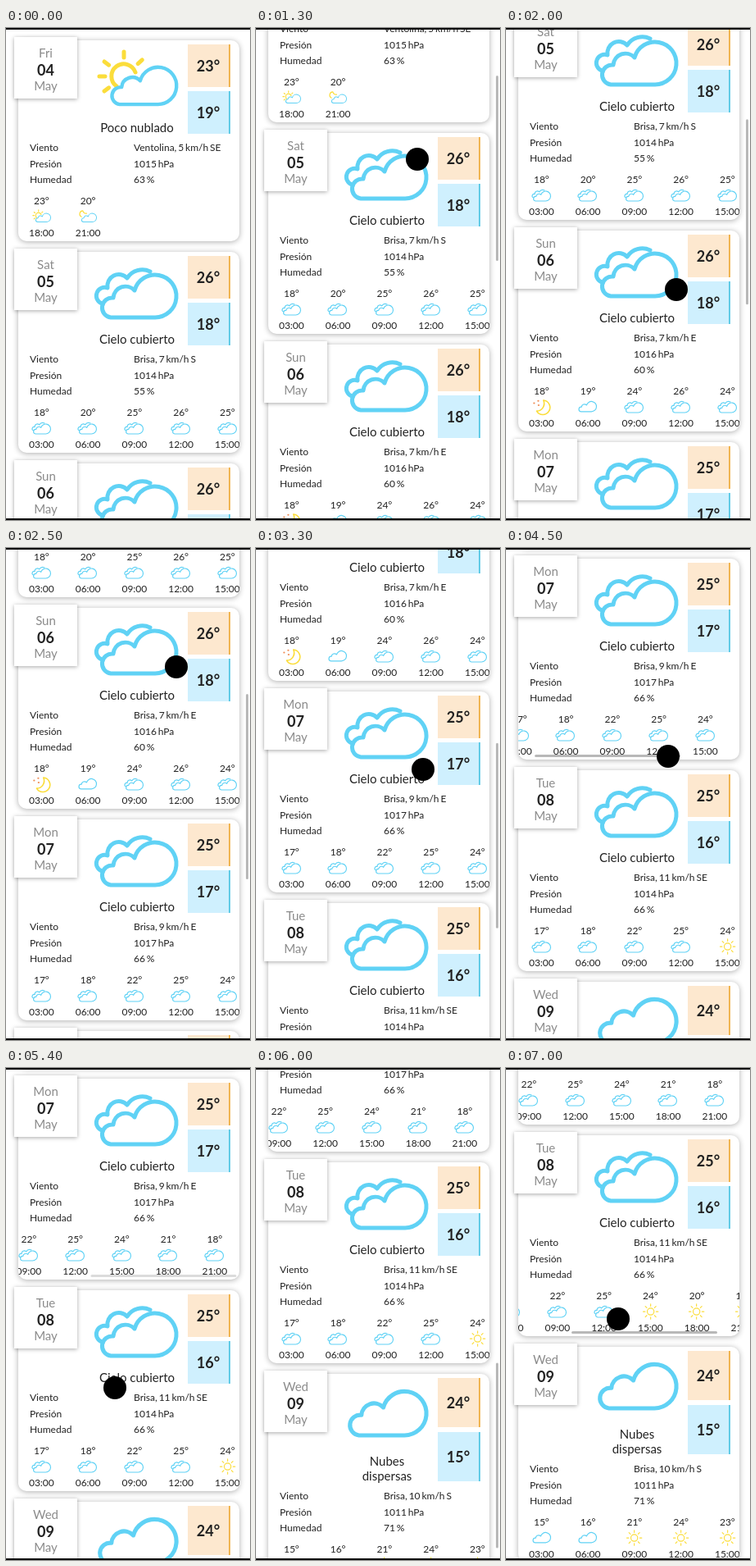
These frames come from a looping animation (298x600 px, 7.1 s). An HTML page:

```html
<!DOCTYPE html>
<html lang="es">
<head>
<meta charset="utf-8">
<title>Pronóstico</title>
<style>
  html, body { margin: 0; width: 100%; height: 100%; overflow: hidden; background: #fff; }
  body { font: 12px Lato, sans-serif; color: #222; }
  #stage { position: relative; width: 298px; height: 600px; overflow: hidden; }
  #stage::before, #stage::after { content: ""; position: absolute; z-index: 2; left: 0; width: 100%; height: 2px; background: #0c0c0c; }
  #stage::before { top: 0; }
  #stage::after { bottom: 0; }
  #stage div, #stage svg { position: absolute; }
  #list { left: 0; top: 0; }
  .card { left: 15px; width: 270px; border-radius: 10px; background: #fff; box-shadow: 0 1px 7px rgba(0,0,0,.32); }
  .date { left: -5px; top: -4px; width: 77px; height: 75px; background: #fff; box-shadow: 0 1px 5px rgba(0,0,0,.34); }
  .text { height: 20px; line-height: 20px; white-space: nowrap; }
  .mid { text-align: center; }
  .grey { color: #8b8b8b; font-size: 15px; }
  .bold { font-size: 18px; font-weight: 700; }
  .value { word-spacing: -1.2px; }
  .temp { left: 207px; width: 50px; display: grid; place-items: center; border-right: 2px solid; }
  .max { top: 5px; background: #fde8cf; border-color: #f0b552; }
  .min { background: #cff0fe; border-color: #62cbe6; }
  .sky { left: 75px; width: 140px; line-height: 18px; font-size: 15px; text-align: center; }
  .hours { left: 0; width: 270px; height: 61px; overflow: hidden; border-radius: 0 0 10px 10px; }
  .bar { background: #b8b8b8; border-radius: 2px; opacity: 0; }
  .hbar { width: 178px; height: 3px; left: 2px; }
  #vbar { width: 3px; height: 226px; left: 293px; }
  #dot { width: 28px; height: 28px; border-radius: 50%; background: #000; }
  svg { fill: none; stroke-width: 5; stroke-linecap: round; stroke-linejoin: round; overflow: visible; }
  .blue { stroke: #60d2f5; }
  .gold { stroke: #fbdd3b; }
</style>
</head>
<body>
<div id="stage">
  <div id="list"></div>
  <div id="vbar" class="bar"></div>
  <div id="dot"></div>
</div>
<script>
const PITCH = 258, STEP = 56.75, LOOP = 7100;
const $ = id => document.getElementById(id);

// Icons share a 110 x 70 box
const cloudPath = 'M22 65H76A26 26 0 1 0 51 32A15 15 0 0 0 25 41A12 12 0 0 0 22 65Z';
const cloudAt = place => `<path class="blue" d="${cloudPath}" transform="${place}"/>`;
const rays = (x, y, r1, r2, angles) => angles.map(a => {
  const c = Math.cos(a * Math.PI / 180), s = Math.sin(a * Math.PI / 180);
  return `M${x + r1 * c} ${y + r1 * s}L${x + r2 * c} ${y + r2 * s}`;
}).join('');
const small = 'translate(13.5 6.5) scale(.87)';
const icons = {
  overcast: cloudAt('') + '<path class="blue" d="M11 48A10 10 0 0 1 18 29A14 14 0 0 1 42 17A22 22 0 0 1 70 9"/>',
  cloud: cloudAt('translate(-3 -7) scale(1.03)'),
  sunny: `<path class="gold" d="M29 41A15 15 0 1 1 52 24${rays(38, 29, 23, 30, [-180, -143, -90, -42, 143])}"/>` + cloudAt(small),
  night: '<path class="gold" d="M22 36A17 17 0 0 1 30 4A18 18 0 0 0 50 18"/>' + cloudAt(small),
  sun: `<path class="gold" d="M37 35a18 18 0 1 0 36 0a18 18 0 1 0 -36 0${rays(55, 35, 29, 40, [0, 45, 90, 135, 180, 225, 270, 315])}"/>`,
  moon: '<path class="gold" stroke-width="7" d="M64 0A38 38 0 1 1 28 57A40 40 0 0 0 64 0Z"/>' +
        '<path stroke="#f0905a" stroke-width="9" d="M14 15h1M36 3h1M38 26h1"/>'
};
const codes = { o: 'overcast', c: 'cloud', p: 'sunny', n: 'night', s: 'sun', m: 'moon' };
const icon = (name, x, y, scale) =>
  `<svg width="110" height="70" style="left:${x}px;top:${y}px;transform-origin:0 0;transform:scale(${scale})">${icons[name]}</svg>`;
const text = (s, x, y, cls = '', width = '') =>
  `<div class="text ${cls}" style="left:${x}px;top:${y - 10}px;${width && `width:${width}px`}">${s}</div>`;

// name, max, min, sky, icon, wind, pressure, humidity, first hour, hourly temperature + icon code
const days = [
  ['Fri', 23, 19, 'Poco nublado', 'sunny', 'Ventolina, 5 km/h SE', 1015, 63, 18, '23p 20n'],
  ['Sat', 26, 18, 'Cielo cubierto', 'overcast', 'Brisa, 7 km/h S', 1014, 55, 3, '18o 20o 25o 26o 25o'],
  ['Sun', 26, 18, 'Cielo cubierto', 'overcast', 'Brisa, 7 km/h E', 1016, 60, 3, '18m 19c 24o 26o 24o'],
  ['Mon', 25, 17, 'Cielo cubierto', 'overcast', 'Brisa, 9 km/h E', 1017, 66, 3, '17o 18o 22o 25o 24o 21o 18o'],
  ['Tue', 25, 16, 'Cielo cubierto', 'overcast', 'Brisa, 11 km/h SE', 1014, 66, 3, '17o 18o 22o 25o 24s 20s 18s'],
  ['Wed', 24, 15, 'Nubes<br>dispersas', 'cloud', 'Brisa, 10 km/h S', 1011, 71, 3, '15c 16c 21s 24s 23s']
];

$('list').innerHTML = days.map(([day, max, min, sky, pic, wind, press, hum, first, hourly], i) => {
  const extra = sky.includes('<br>') ? 18 : 0;
  const tempHeight = 51.5 + extra * .45;
  const rows = [['Viento', wind], ['Presión', press + ' hPa'], ['Humedad', hum + ' %']];
  const hours = hourly.split(' ').map((item, k) => {
    const x = k * STEP;
    const clock = String(first + 3 * k).padStart(2, '0') + ':00';
    return text(item.slice(0, 2) + '°', x, 12, 'mid', STEP) +
      icon(codes[item[2]], x + 15.7, 23, .23) + text(clock, x, 51, 'mid', STEP);
  }).join('');
  return `<div class="card" style="top:${15 + i * PITCH}px;height:${245 + extra}px">
    <div class="date">${text(day, 0, 19, 'mid grey', 77)}${text('0' + (4 + i), 0, 39.5, 'mid bold', 77)}${text('May', 0, 59, 'mid grey', 77)}</div>
    ${icon(pic, 91, 15, 1)}
    <div class="temp max bold" style="height:${tempHeight}px">${max}°</div>
    <div class="temp min bold" style="top:${62 + extra / 2}px;height:${tempHeight}px">${min}°</div>
    <div class="sky" style="top:97px">${sky}</div>
    ${rows.map(([a, b], r) => text(a, 14, 131 + extra + r * 19.6) + text(b, 141, 131 + extra + r * 19.6, 'value')).join('')}
    <div class="hours" style="top:${184 + extra}px"><div class="strip">${hours}</div></div>
    <div class="bar hbar" style="top:${239 + extra}px"></div>
  </div>`;
}).join('');

const track = (t, keys) => {
  const n = keys.findIndex(k => k[0] > t);
  if (n < 0) return keys[keys.length - 1][1];
  if (n === 0) return keys[0][1];
  const [t0, a] = keys[n - 1], [t1, b] = keys[n];
  return a + (b - a) * (t - t0) / (t1 - t0);
};

const pageKeys = [[900, 0], [1300, 145], [1500, 220], [1700, 262], [1900, 280], [2100, 288], [2200, 302],
  [2500, 458], [2700, 500], [3000, 514], [3300, 614], [3500, 700], [3700, 745], [3900, 768], [4200, 776],
  [5500, 776], [5900, 920], [6200, 955], [6500, 965]];
const pageFade = [[800, 0], [900, 1], [4250, 1], [4450, 0], [5500, 0], [5600, 1], [6500, 1], [6800, 0]];
const strips = [
  { day: 3, keys: [[4350, 0], [4500, 27], [4800, 105], [5000, 125], [5100, 129]], fade: [[4350, 0], [4450, 1], [5300, 1], [5500, 0]] },
  { day: 4, keys: [[6600, 0], [7000, 94]], fade: [[6600, 0], [6700, 1]] }
];
// from, to, x, y, and which scroll offset the finger drags
const touches = [
  [700, 1500, 197, 305, 'page'], [2000, 2700, 208, 603, 'page'], [2900, 3600, 204, 884, 'page'],
  [4300, 4900, 225, 254, 0], [5300, 5900, 133, 1166, 'page'], [6450, LOOP, 231, 306, 1]
];
const stripEls = document.querySelectorAll('.strip'), hbars = document.querySelectorAll('.hbar');
const move = (el, x, y) => el.style.transform = `translate(${x}px,${y}px)`;

function draw(t) {
  const page = Math.round(track(t, pageKeys));
  move($('list'), 0, -page);
  move($('vbar'), 0, 2.5 + page * .383);
  $('vbar').style.opacity = track(t, pageFade);
  const offsets = strips.map(({ day, keys, fade }) => {
    const x = Math.round(track(t, keys));
    move(stripEls[day], -x, 0);
    move(hbars[day], x * .67, 0);
    hbars[day].style.opacity = track(t, fade);
    return x;
  });
  const touch = touches.find(([from, to]) => t >= from && t < to);
  $('dot').style.display = touch ? '' : 'none';
  if (touch) {
    const [, , x, y, drag] = touch;
    if (drag === 'page') move($('dot'), x - 14, y - page - 14);
    else move($('dot'), x - offsets[drag] - 14, y - 14);
  }
}

const start = performance.now();
function tick() {
  const t = (performance.now() - start) % LOOP;
  draw(Math.floor(t / 100) * 100);
  requestAnimationFrame(tick);
}
tick();
</script>
</body>
</html>
```
